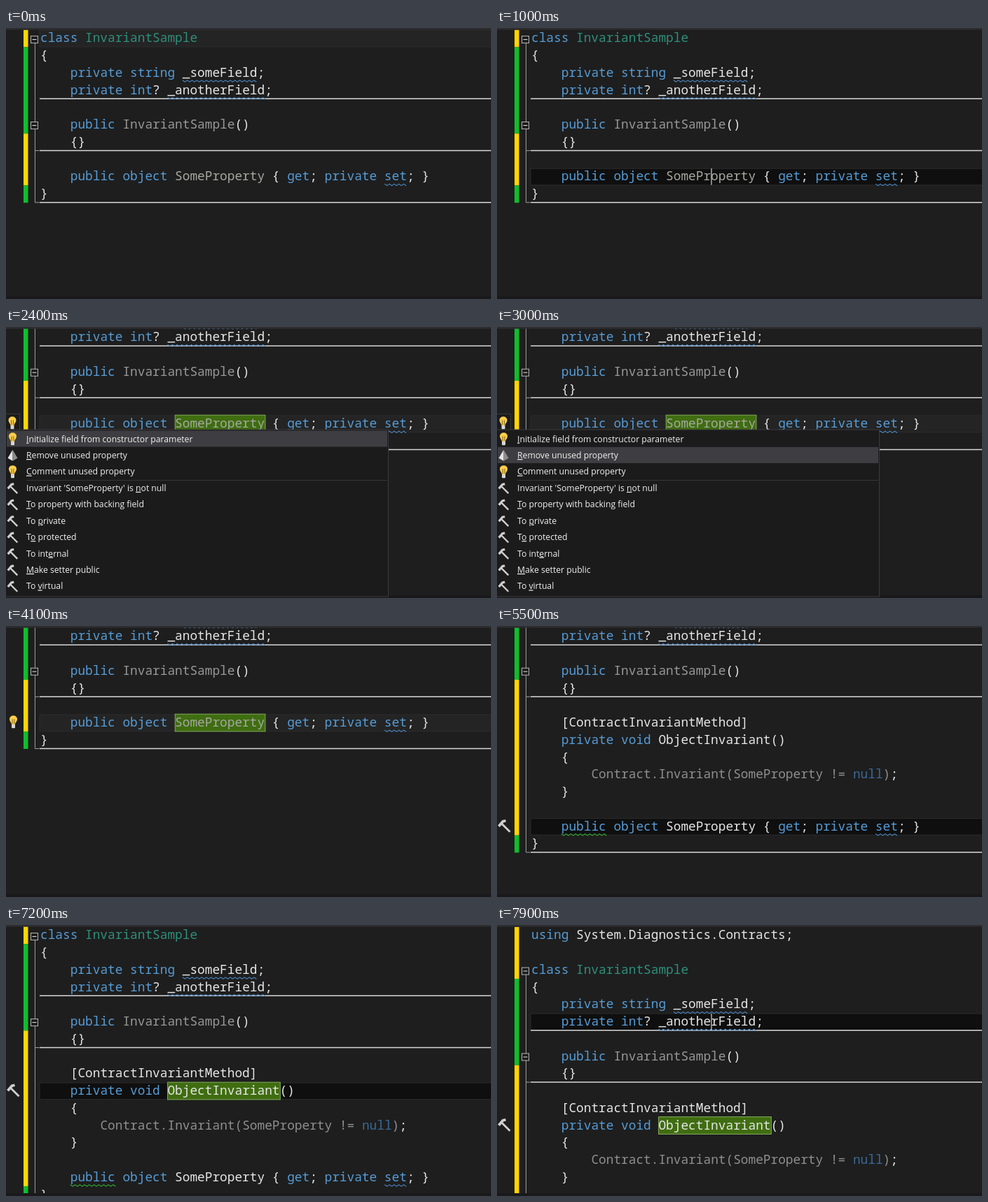
An HTML page for the animation above (8000 ms loop, 692x388 px).

```html
<!DOCTYPE html>
<html lang="en">
<head>
<meta charset="utf-8">
<title>Code editor</title>
<style>
  html, body { margin: 0; width: 100%; height: 100%; overflow: hidden; background: #1e1e1e; }
  svg { display: block; width: 692px; height: 388px; }
  text { white-space: pre; }
  .code { font: 500 17.8px "Noto Sans Mono", "DejaVu Sans Mono", monospace; }
  .menu { font: 12.2px "Open Sans", "Noto Sans", sans-serif; fill: #f1f1f1; }
</style>
</head>
<body>
<script>
const LOOP = 8000, ROW = 24.75, TOP = 2.7, LEFT = 49, CHAR = 10.68, CARET_COLUMN = 24;
const LIGHT = '#e6e6e6', KEYWORD = '#569cd6', FADED = '#979797', RULE = '#d8d8d8';
const KEYWORDS = /^(class|using|private|public|string|int|object|void|get|set|null)$/;

function add(parent, tag, attrs = {}, text) {
  const el = document.createElementNS('http://www.w3.org/2000/svg', tag);
  for (const name in attrs) el.setAttribute(name, attrs[name]);
  if (text !== undefined) el.textContent = text;
  parent.append(el);
  return el;
}
const rect = (parent, x, y, width, height, fill, more) =>
  add(parent, 'rect', { x, y, width, height, fill, ...more });
const stroke = (parent, d, color, width = 1) =>
  add(parent, 'path', { d, stroke: color, 'stroke-width': width, fill: 'none' });
const rowTop = row => TOP + row * ROW;
const columnX = column => LEFT + column * CHAR;
const show = (el, on) => el.setAttribute('visibility', on ? 'visible' : 'hidden');

// Source lines: [row, text, colours of single words, base colour]
const head = [
  [0, 'class InvariantSample', { InvariantSample: '#2e8f7b' }],
  [1, '{'],
  [2, '    private string _someField;'],
  [3, '    private int? _anotherField;'],
  [5, '    public InvariantSample()', { InvariantSample: FADED }],
  [6, '    {}']
];
const property = '    public object SomeProperty { get; private set; }';
const versions = [
  {
    last: 9, first: 0,
    lines: [...head, [8, property, { SomeProperty: '#a6a8a2' }], [9, '}']],
    waves: [[8, 46, 3]]
  },
  {
    last: 15, first: -2,
    lines: [
      [-2, 'using System.Diagnostics.Contracts;'],
      ...head,
      [8, '    [ContractInvariantMethod]'],
      [9, '    private void ObjectInvariant()'],
      [10, '    {'],
      [11, '        Contract.Invariant(SomeProperty != null);', { null: '#3a6995', ';': LIGHT }, '#8f8f8f'],
      [12, '    }'],
      [14, property],
      [15, '}']
    ],
    waves: [[14, 46, 3], [14, 4, 6, '#35b535']]
  }
];

function drawLine(parent, [row, text, colors = {}, base = LIGHT]) {
  const body = text.trimStart();
  const line = add(parent, 'text', {
    class: 'code', x: columnX(text.length - body.length), y: rowTop(row) + 17.7, fill: base
  });
  for (const word of body.split(/(\w+|;)/)) {
    if (!word) continue;
    const fill = colors[word] || (KEYWORDS.test(word) ? KEYWORD : base);
    add(line, 'tspan', { fill }, word);
  }
}

function drawWave(parent, [row, column, length, color = '#4d8ccb']) {
  let d = `M${columnX(column)} ${rowTop(row) + 22.6}`;
  for (let x = 0, up = false; x < length * CHAR - 2; x += 3.4, up = !up) d += `l3.4 ${up ? -2.4 : 2.4}`;
  stroke(parent, d, color, 1.1);
}

function drawFold(parent, row) {
  const y = Math.round(rowTop(row) + 8) + .5;
  rect(parent, 35.5, y, 10, 10, '#1e1e1e', { stroke: '#b4b4b4' });
  stroke(parent, `M37.5 ${y + 5}h6`, '#e0e0e0');
}

function drawVersion(parent, { first, last, lines, waves }) {
  const g = add(parent, 'g');
  const bar = (from, to, color) => rect(g, 25, rowTop(from), 6.5, (to - from) * ROW, color);
  bar(first, 1, '#ffd500');
  bar(1, 6, '#10bd2e');
  bar(6, last, '#ffd500');
  bar(last, last + 1, '#10bd2e');
  stroke(g, `M41.4 ${rowTop(.6)}V${rowTop(last + 1) - .4}h6M41.4 ${rowTop(7) - .4}h6`, '#a0a0a0');
  for (const row of [4, 7, last + 1]) stroke(g, `M48 ${rowTop(row) - .4}H692`, RULE, 1.5);
  drawFold(g, 0);
  drawFold(g, 5);
  lines.forEach(line => drawLine(g, line));
  [[2, 19, 10], [3, 17, 13], ...waves].forEach(wave => drawWave(g, wave));
  return g;
}

const icons = {
  bulb(parent, x, y) {
    const g = add(parent, 'g', { transform: `translate(${x} ${y})` });
    add(g, 'path', { d: 'M-2.5 4C-2.5 1-5.5-.5-5.5-4a5.5 5 0 0 1 11 0C5.5-.5 2.5 1 2.5 4z', fill: '#ffcf4a' });
    rect(g, -2.5, 3.5, 5, 5.5, '#d6d6d6', { rx: 1 });
    stroke(g, 'M-1.4-4v7M1.4-4v7', '#6b551c', .9);
    return g;
  },
  hammer(parent, x, y, scale = 1) {
    const g = add(parent, 'g', { transform: `translate(${x} ${y}) scale(${scale})` });
    stroke(g, 'M-8 1L-2-6L2-7', '#cfcfcf', 3.8);
    stroke(g, 'M-4-3L8 9', '#cfcfcf', 2.8);
    return g;
  },
  prism(parent, x, y) {
    const g = add(parent, 'g', { transform: `translate(${x} ${y})` });
    add(g, 'path', { d: 'M0-8L-7 4L0 8z', fill: '#e4e4e4' });
    add(g, 'path', { d: 'M0-8L7 4L0 8z', fill: '#8c8c8c' });
    return g;
  }
};

// "&" stands before the underlined letter
const items = [
  ['bulb', '&Initialize field from constructor parameter'],
  ['prism', '&Remove unused property'],
  ['bulb', '&Comment unused property'],
  ['hammer', "Invariant 'SomeProperty' is &not null"],
  ['hammer', '&To property with backing field'],
  ['hammer', 'To &private'],
  ['hammer', 'T&o protected'],
  ['hammer', 'To int&ernal'],
  ['hammer', '&Make setter public'],
  ['hammer', 'To &virtual']
];
const ITEM = 23.42;

function drawMenu(parent) {
  const g = add(parent, 'g');
  rect(g, -1, 147, 546.5, 239, '#1b1b1c', { stroke: '#3a3a3f' });
  const hover = rect(g, 1, 148.5, 543, 23, '#3e3e42');
  stroke(g, 'M29 219.5H544', '#36363a');
  items.forEach(([icon, label], i) => {
    const y = 160.3 + i * ITEM;
    icons[icon](g, 9.5, y, .85);
    const text = add(g, 'text', { class: 'menu', x: 29, y: y + 4.3 });
    const [before, after] = label.split('&');
    add(text, 'tspan', {}, before);
    add(text, 'tspan', { 'text-decoration': 'underline' }, after[0]);
    add(text, 'tspan', {}, after.slice(1));
  });
  return { g, hover };
}

const svg = add(document.body, 'svg', { viewBox: '0 0 692 388' });
rect(svg, 0, 0, 692, 388, '#1e1e1e');
const page = add(svg, 'g');
const current = rect(page, 48, 0, 646, ROW - 1, '', { stroke: '#2c2c2c' });
const selection = rect(page, 0, 0, 0, ROW, '#3f6d10', { stroke: '#86ad5f' });
const docs = versions.map(version => drawVersion(page, version));
const caret = rect(page, 0, 0, 1.3, ROW - 1, '#c4c4c4');
rect(svg, 0, 0, 692, 2.6, '#2d2d30');
rect(svg, 0, 384, 692, 4, '#19191b');
const bulbBox = rect(svg, -1, 124.5, 20.5, 23, '#1b1b1c', { stroke: '#3a3a3f' });
const gutter = { bulb: icons.bulb(svg, 0, 0), hammer: icons.hammer(svg, 0, 0) };
const menu = drawMenu(svg);

const someProperty = { row: 8, column: 18, length: 12 };
const objectInvariant = { row: 9, column: 17, length: 15 };

// Each step changes a part of the state at its time in ms
const steps = [
  [0, { doc: 0, scroll: 0, line: 0, focus: false, caret: false, mark: null, icon: null, iconRow: 8, open: false, hover: -1 }],
  [800, { line: 8, focus: true, caret: true }],
  [1100, { mark: someProperty }],
  [1400, { scroll: 3, icon: 'bulb' }],
  [2100, { focus: false, caret: false, open: true }],
  [2300, { hover: 0 }],
  [3000, { hover: 1 }],
  [3100, { hover: 2 }],
  [3300, { hover: 3 }],
  [4100, { hover: -1, open: false }],
  [4900, { doc: 1, line: 14, focus: true, mark: null, icon: null }],
  [5300, { icon: 'hammer', iconRow: 14 }],
  [6100, { caret: true }],
  [6400, { line: 13, icon: null }],
  ...[12, 11, 10, 9].map((line, i) => [6500 + i * 100, { line }]),
  [6900, { scroll: 0 }],
  [7000, { mark: objectInvariant }],
  [7200, { icon: 'hammer', iconRow: 9, caret: false }],
  [7300, { scroll: -2, caret: true }],
  ...[8, 7, 6, 5, 4, 3].map((line, i) => [7400 + i * 100, { line }])
];

function render(s) {
  page.setAttribute('transform', `translate(0 ${-s.scroll * ROW})`);
  docs.forEach((doc, i) => show(doc, i === s.doc));
  current.setAttribute('y', rowTop(s.line) + .5);
  current.setAttribute('fill', s.focus ? '#0f0f0f' : '#242424');

  show(selection, s.mark);
  if (s.mark) {
    selection.setAttribute('x', columnX(s.mark.column));
    selection.setAttribute('y', rowTop(s.mark.row) - .3);
    selection.setAttribute('width', s.mark.length * CHAR + .5);
  }

  const line = versions[s.doc].lines.find(([row]) => row === s.line);
  show(caret, s.caret);
  caret.setAttribute('x', columnX(Math.min(CARET_COLUMN, line ? line[1].length : 0)));
  caret.setAttribute('y', rowTop(s.line) + .3);

  show(bulbBox, s.open);
  for (const name in gutter) {
    show(gutter[name], s.icon === name);
    const y = rowTop(s.iconRow - s.scroll) + 10.8;
    gutter[name].setAttribute('transform', `translate(${s.open ? 9 : 10.5} ${y})`);
  }

  show(menu.g, s.hover >= 0);
  menu.hover.setAttribute('y', 148.5 + s.hover * ITEM);
}

let shown = -1;
const start = performance.now();
function tick() {
  const time = (performance.now() - start) % LOOP;
  const count = steps.filter(([at]) => at <= time).length;
  if (count !== shown) {
    shown = count;
    render(Object.assign({}, ...steps.slice(0, count).map(([, change]) => change)));
  }
  requestAnimationFrame(tick);
}
tick();
</script>
</body>
</html>
```
